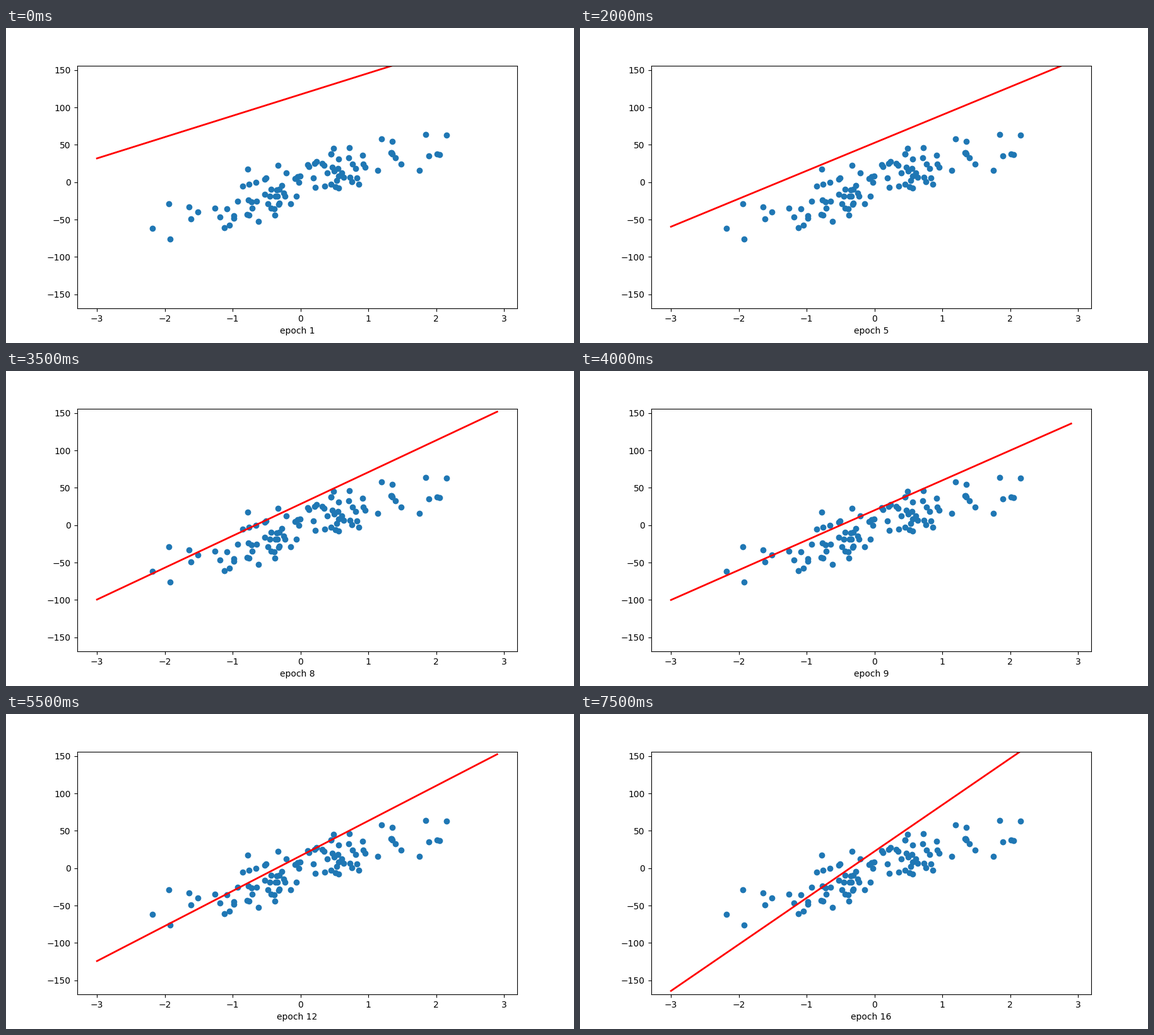
A matplotlib script for the animation above (8000 ms loop, 900 by 500 pixels).

```python
import numpy as np
import matplotlib.pyplot as plt
from matplotlib.animation import FuncAnimation

plt.rcParams["font.family"] = "DejaVu Sans"
EPOCHS = 16

# Noisy linear data
rng = np.random.RandomState(13)
X = rng.randn(100)
coef = 100 * rng.rand()
y = coef * X + rng.normal(scale=20, size=100)

# Key epochs of the fit; those between are interpolated
KEYS = [1, 3, 5, 7, 9, 10, 12, 15, 16]
SLOPES = [28.5, 30.6, 37.4, 45.2, 40, 40.1, 46.9, 52.5, 62.2]
INTERCEPTS = [117.4, 75.1, 52.7, 36.7, 20, 19.4, 16.5, 20.2, 22.5]

fig, ax = plt.subplots(figsize=(9, 5), dpi=100)
fig.subplots_adjust(left=0.125, right=0.9, bottom=0.11, top=0.88)

grid = np.arange(-3, 3, 0.1)
ax.scatter(X, y)
line, = ax.plot(grid, 50 * grid - 4, "r-", linewidth=2)
ax.set_xlim(-3.295, 3.195)
ax.set_ylim(-168.75, 155.75)


def update(i):
    epoch = i + 1
    m = np.interp(epoch, KEYS, SLOPES)
    b = np.interp(epoch, KEYS, INTERCEPTS)
    line.set_ydata(m * grid + b)
    ax.set_xlabel(f"epoch {epoch}")
    return line, ax


anim = FuncAnimation(fig, update, frames=EPOCHS, interval=500,
                     repeat=True, repeat_delay=0, blit=False)
plt.show()
```
